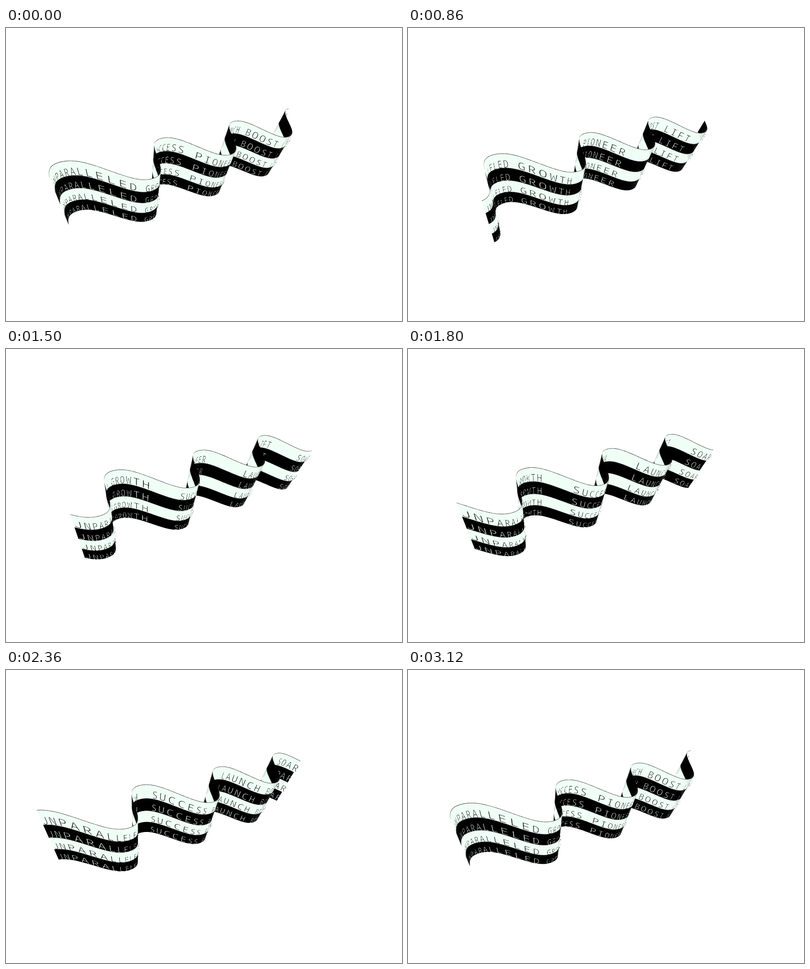
Recreate the animation shown at these times as an HTML page with a canvas. Size 870x644 px, loop 3140 ms.

```html
<!DOCTYPE html>
<html lang="en">
<head>
<meta charset="utf-8">
<title>Waving ribbon</title>
<style>
  html, body { margin: 0; width: 100%; height: 100%; overflow: hidden; background: #fff; }
  canvas { display: block; }
</style>
</head>
<body>
<canvas id="stage" width="870" height="644"></canvas>
<script>
const LOOP = 3140;
const MINT = '#f0fff6', BLACK = '#000';
const WORDS = 'UNPARALLELED GROWTH   SUCCESS PIONEER     LAUNCH BOOST LIFT    SOAR';

// Lettering texture: four rows, one character cell per letter
const TEX_W = 2000, BAND_H = 56, BANDS = 4;
const CELL = 0.01503 * TEX_W, FIRST = 6.5;
const SLICES = 400, SLICE_W = TEX_W / SLICES, OVERLAP = 2;
const LIFT = 0.1; // the lettering floats this far in front of the ribbon

const ctx = document.getElementById('stage').getContext('2d');
const stripe = (band, back) => (band % 2 === 0) !== back ? MINT : BLACK;

function makeLettering() {
  const tex = document.createElement('canvas');
  tex.width = TEX_W;
  tex.height = BAND_H * BANDS;
  const g = tex.getContext('2d');
  g.font = '200 41px "Noto Sans Mono", "DejaVu Sans Mono", monospace';
  g.textAlign = 'center';
  g.lineWidth = 1.9;
  g.lineJoin = 'round';
  const eachLetter = paint => {
    for (let band = 0; band < BANDS; band++) {
      g.fillStyle = stripe(band, true);
      [...WORDS].forEach((ch, i) => paint(ch, FIRST + i * CELL, (band + 0.9) * BAND_H));
    }
  };
  eachLetter((ch, x, y) => g.fillText(ch, x, y));
  // Shave the outlines down to hairline strokes
  g.globalCompositeOperation = 'destination-out';
  eachLetter((ch, x, y) => g.strokeText(ch, x, y));
  return tex;
}
const lettering = makeLettering();

// Depth of the wave at position s (0..1) along the ribbon, within -1..1
function depth(s, turn) {
  const p = turn - 0.33 - 20.1 * s;
  return (Math.sin(p) + 0.06 * Math.sin(3 * p)) / 0.94;
}

// Perspective view: s along the ribbon, z depth, v across the ribbon
function project(s, z, v) {
  const w = 1 + 0.65 * s + 0.0117 * z + 0.28 * v;
  return [
    (114.7 + 952.9 * s + 49.9 * z + 80.9 * v) / w,
    (343.8 - 13.8 * s + 40.5 * z + 224.4 * v) / w
  ];
}

// Maps texture pixels of one cell to the stage; true if its front is visible
function place(i, band, lift, turn) {
  const s0 = i / SLICES, s1 = (i + 1) / SLICES, v = band / BANDS;
  const z0 = depth(s0, turn) + lift, z1 = depth(s1, turn) + lift;
  const [x, y] = project(s0, z0, v);
  const [ax, ay] = project(s1, z1, v);
  const [bx, by] = project(s0, z0, v + 1 / BANDS);
  const ux = (ax - x) / SLICE_W, uy = (ay - y) / SLICE_W;
  const vx = (bx - x) / BAND_H, vy = (by - y) / BAND_H;
  ctx.setTransform(ux, uy, vx, vy, x, y);
  return ux * vy - uy * vx > 0;
}

function drawCloth(i, turn) {
  const width = i < SLICES - 1 ? SLICE_W + OVERLAP : SLICE_W;
  for (let band = 0; band < BANDS; band++) {
    const front = place(i, band, 0, turn);
    ctx.fillStyle = stripe(band, !front);
    ctx.fillRect(0, 0, width, band < BANDS - 1 ? BAND_H + OVERLAP : BAND_H);
    if (band === 0) {
      ctx.fillStyle = BLACK;
      ctx.fillRect(0, 0, width, 1.2);
    }
  }
}

function drawLetters(i, turn) {
  const width = Math.min(SLICE_W + 0.5, TEX_W - i * SLICE_W);
  for (let band = 0; band < BANDS; band++) {
    place(i, band, LIFT, turn);
    ctx.drawImage(lettering, i * SLICE_W, band * BAND_H, width, BAND_H, 0, 0, width, BAND_H);
  }
}

function draw() {
  const turn = (performance.now() % LOOP) / LOOP * 2 * Math.PI;
  ctx.setTransform(1, 0, 0, 1, 0, 0);
  ctx.fillStyle = '#fff';
  ctx.fillRect(0, 0, 870, 644);
  // The left end is nearest, so paint from right to left
  for (let i = SLICES - 1; i >= 0; i--) {
    const layers = [drawCloth, drawLetters];
    if (!place(i, 0, 0, turn)) layers.reverse();
    layers.forEach(layer => layer(i, turn));
  }
  requestAnimationFrame(draw);
}
draw();
</script>
</body>
</html>
```
